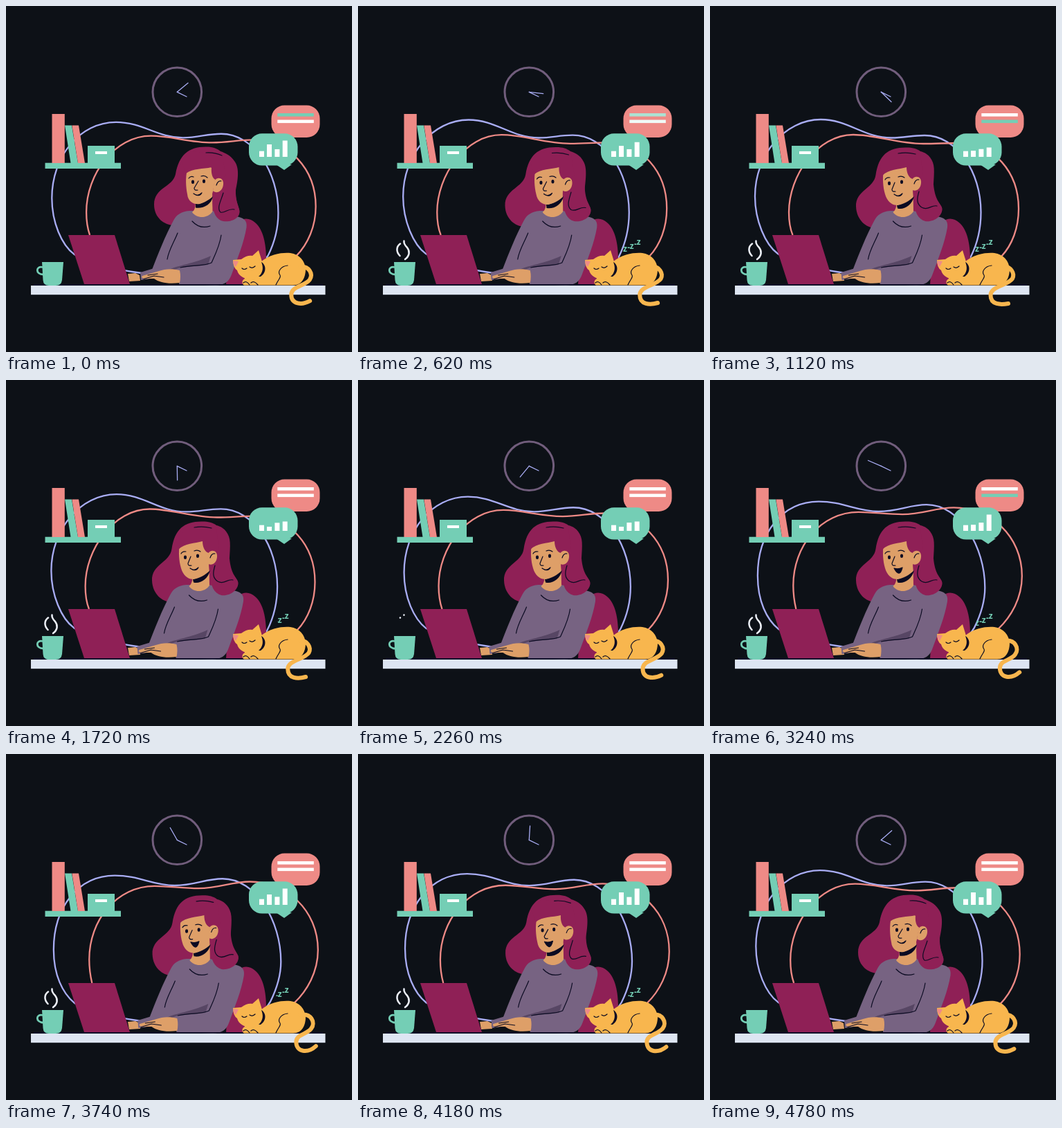
These frames come from a looping animation (500 px wide and 500 px high, 4.8 s). An HTML page:

```html
<!DOCTYPE html>
<html lang="en">
<head>
<meta charset="utf-8">
<title>Working late</title>
<style>
  html, body { margin: 0; width: 100%; height: 100%; overflow: hidden; background: #0d1117; }
  svg { display: block; width: 100%; height: 100%; }
  .teal { fill: #74ceb5; }
  .coral { fill: #ee8a86; }
  .wine { fill: #8f2056; }
  .wool { fill: #776382; }
  .skin { fill: #de9f68; }
  .cat { fill: #f8b64e; }
  .white { fill: #fff; }
  .ink { fill: #0b0b22; }
  .line { fill: none; stroke: #0b0b22; stroke-width: 1.2; stroke-linecap: round; stroke-linejoin: round; }
  .eyes { stroke-width: 4; }
  .tail { fill: none; stroke: #f8b64e; stroke-width: 6; stroke-linecap: round; }
  .loop { fill: none; stroke-width: 2.3; }
  .steam { fill: none; stroke: #eef2fb; stroke-width: 2.5; stroke-linecap: round; }
  .snore { font: bold 12px "Open Sans", sans-serif; }
</style>
</head>
<body>
<svg viewBox="0 0 500 500">
  <clipPath id="snoreClip"><rect id="snoreWindow" y="330" height="30"/></clipPath>

  <g fill="none" stroke="#a9adf4" stroke-width="1.3" stroke-linecap="round">
    <circle cx="247.3" cy="124.3" r="35.3" stroke="#715d7c" stroke-width="3"/>
    <path d="M247.3,124.3L261,131"/>
    <path id="minute" d="M247.3,124.3h20.5"/>
  </g>

  <path class="loop" stroke="#a9adf4" data-by="sway"
    d="M65,275C65,215 108,164 160,164C200,164 222,190.5 262,190.5C282,190.5 290,187 310,187C357,187 391.5,240 391.5,298C391.5,320 387,342 377,362C360,390 300,395 196,386C160,381 120,372 98,358C80,345 65,310 65,275Z"
    data-to="M69,283C69,222 104,176 157,176C192,176 212,190 243,190C272,190 288,180 313,180C362,180 397.5,242 397.5,300C397.5,320 392,338 382,358C365,390 300,395 196,386C160,381 120,372 99,360C82,346 69,320 69,283Z"/>
  <path class="loop" stroke="#ee8a86" data-by="sway"
    d="M119.5,331C115,320 114,310 114,298C114,245 155,186 207,186C240,186 270,199 308,199C328,199 340,198 360,198C410,198 446,240 446,293C446,320 437,345 421,362"
    data-to="M124.5,331C122,320 120.5,310 120.5,297C120.5,240 160,191 215,191C235,191 255,194 277,194C307,194 325,184 352,184C405,184 451,225 451,283C451,315 435,342 416,360"/>

  <!-- shelf -->
  <rect class="teal" x="56.5" y="226.7" width="109.5" height="8.3"/>
  <rect class="coral" x="66.5" y="156" width="18.3" height="71"/>
  <path class="teal" d="M85,172.5H95L104,227H93.5Z"/>
  <path class="coral" d="M95.3,172.5H105L114,227H104Z"/>
  <rect class="teal" x="118" y="202" width="39" height="25"/>
  <rect class="white" x="129" y="210" width="17" height="4"/>

  <!-- speech bubbles -->
  <rect class="coral" x="383.5" y="143.5" width="70" height="46.5" rx="19"/>
  <rect id="row1" x="392.3" y="155" width="52.5" height="4.6"/>
  <rect id="row2" x="392.3" y="164.5" width="52.5" height="4.6"/>
  <rect class="teal" x="351" y="184.3" width="70.5" height="46.3" rx="19"/>
  <path class="teal" d="M390,229H413L402,237Z"/>
  <g id="bars" class="white">
    <rect x="366" width="7"/><rect x="377" width="7"/><rect x="388.4" width="7"/><rect x="399.7" width="7"/>
  </g>

  <!-- woman -->
  <path class="wine" d="M318,403L322,330C335,304 350,304 360,313C372,323 376,345 376,365V403Z"/>
  <path class="wine" data-by="lean"
    d="M290,203.5C264,203 250,215 245,243C241,262 214,262 214,287C214,306 229,317 243,317L300,310C325,312 340,308 337,294C335,286 331,280 332,266C335,252 338,234 330,224C325,216 316,212 310,210C305,206 299,203.5 290,203.5Z"
    data-to="M284,204.5C258,204 244,215 239.5,244C237,264 210,266 211,290C212,310 226,320 238,321L296,310C312,312 339,305 335,291C332,284 325,280 323,268C322,256 326,236 322,226C318,215 309,211 304,210C299,206 292,204.5 284,204.5Z"/>
  <path class="skin" d="M176,387L187,386L193,389L194,397L178,398Z"/>
  <g id="torso">
    <path class="wool" d="M194,385L214,379L250,366V384L215,393L195,396Z"/>
    <path class="wool" d="M265,296C253,297 246,302 242,310C230,332 220,358 211,381L250,382V402L303,403.5C316,403 322,399 326,388C334,366 344,342 347.5,320C349,309 343,306 332,304L298,296Z"/>
    <path fill="#574664" d="M236,381C250,374 270,373 296,361L292,374L252,378L240,382Z"/>
    <path class="line" d="M248,328C243,341 235,353 233,366M311,331C309,346 302,360 297,371C287,376 270,374 252,378"/>
    <path class="skin" d="M274,278L298,266L298.5,297C292,307 276,308 269,298Q275,294 274,278Z"/>
    <path class="line" d="M269,311Q280,323 295,318"/>
    <path class="skin" d="M251,382C240,379 229,380 221,383L197,390C194,393 200,395 206,394L214,394C222,400 235,402 251,400Q253,391 251,382Z"/>
    <path class="line" d="M199,394.5L214,390L228,392M205,389L219,387"/>
  </g>
  <path class="wine" data-by="lean"
    d="M300,258L332,258C331,280 335,286 337,294C340,306 326,313 314,311C304,309 299,299 298.5,285Z"
    data-to="M292,258L323,258C325,280 332,284 335,291C338,303 323,313 311,311C300,308 296,297 295,283Z"/>
  <path class="line" data-by="lean" d="M314,270C311,281 304,292 310,298C316,300 321,292 330,294" data-to="M302,268C299,278 298,286 306,291C315,296 320,287 328,289"/>
  <path class="ink" data-by="lean"
    d="M274,286C284,286 293,281 299,275C297,287 285,293 274,291.5Z"
    data-to="M270,288C279,287 288,282 295,275C292,288 280,295 271,292.5Z"/>
  <path class="skin" data-by="lean"
    d="M262,236C259,248 260,262 262,272C263,283 272,287.5 280,286C290,283 297,277 299,268L304,240L290,228Z"
    data-to="M251,238C249,248 250,262 253,272C256,283 264,289 272,287.5C282,285 290,278 293,268L295,240L280,228Z"/>
  <path class="wine" data-by="lean"
    d="M260,242C270,234 285,236 297,233C296,243 299,250 303,251L318,246L312,215L270,210L254,226Z"
    data-to="M249,245C258,236 273,236 284,233C284,242 288,249 293,250L308,246L304,215L262,212L246,230Z"/>
  <path class="skin" data-by="lean"
    d="M301,253C305,246 315,248 314,258C313,268 304,272 299,267Z"
    data-to="M292,251C296,244 306,246 305,256C304,266 296,269 291,265Z"/>
  <path class="line" data-by="lean" d="M304,259Q306,252 311,253" data-to="M295,257Q297,250 302,251"/>
  <path class="line" data-by="lean" d="M289,212Q300,211 312,216" data-to="M272,213Q285,211 297,214"/>
  <path class="line" data-by="lean"
    d="M264,249Q267,245 271,247M282,246Q287,244 291,248M278,253L272,263Q272,267 277,266"
    data-to="M253,251Q255,247 260,248M272,247Q277,245 281,248M267,255L263,265Q263,269 268,268"/>
  <path class="line eyes" data-by="lean" d="M270,253.5L270,255M286,252.5L286,254" data-to="M259,255.5L259,257M277,253.5L277,255"/>
  <path id="mouth" class="line" style="fill:#0b0b22"/>

  <!-- desk -->
  <rect x="40" y="402" width="418" height="1.6" fill="#0f0f2c"/>
  <rect x="36" y="404" width="425.5" height="13.2" fill="#dde5f2"/>
  <path class="wine" d="M90,331H157L179,402H113Z"/>
  <path class="teal" d="M52,370H83L81,396Q80,404 72,404H62Q54,404 53.5,396Z"/>
  <path d="M53,377.5C43,375 42,388 54,388" fill="none" stroke="#74ceb5" stroke-width="2.8"/>
  <path class="steam" pathLength="100" d="M60.5,361C55,355 55,348 61,343.5"/>
  <path class="steam" pathLength="100" d="M68,366C75,361 75,354 71,349C67,345 66,343 66.5,339.5"/>

  <!-- cat -->
  <path class="cat" d="M344,403.5C340,401 341,396 345,394L345,385L368,370C382,358 400,356 411,357C424,359 432,368 433,380C433,392 428,403.5 415,403.5Z"/>
  <path class="tail" data-by="tail"
    d="M425,377C434,376 441,386 437,394C430,404 405.5,405 405.5,418C405.5,432 420,432 431,430"
    data-to="M425,377C441,374 448,388 441,397C434,406 419.5,405 419.5,416C419.5,431 436,433 448,422"/>
  <path class="cat" d="M328,367L340,366C346,361 352,360 356,361L365,353L369,366C373,377 371,388 362,393C350,397 337,393 334,382Q328,378 328,367Z"/>
  <path class="coral" d="M328.5,368L336,369L332,377Q328,374 328.5,368Z"/>
  <path class="ink" d="M369,370C376,374 377,385 368,391L365,391C372,385 372,377 369,370Z"/>
  <path class="line" d="M341,379Q344,382 348,379M352,377Q356,380 360,376M407,375C397,376 392,384 396,389C398,392 394,394 390,403M343,400Q347,396 352,403M354,400Q358,396 364,403"/>
  <text class="snore teal" clip-path="url(#snoreClip)" x="383 389.2 392.8 399 402.8" y="355 353 350.5 348.3 345">z-z-z</text>
</svg>
<script>
  const LOOP = 4800;
  const $ = id => document.getElementById(id);
  const NUMBER = /-?[\d.]+/g;
  const morphs = [...document.querySelectorAll('[data-to]')].map(el => ({
    el, by: el.dataset.by, from: el.getAttribute('d'), to: el.dataset.to.match(NUMBER)
  }));
  const bars = [...$('bars').children];
  const steam = document.querySelectorAll('.steam');

  // Eased 0..1 progress of t between two moments
  const ramp = (t, a, b) => {
    const p = Math.min(1, Math.max(0, (t - a) / (b - a)));
    return p * p * (3 - 2 * p);
  };
  const wave = (t, low) => (1 - Math.cos((t - low) / LOOP * 2 * Math.PI)) / 2;
  const mix = (from, to, p) => {
    let i = 0;
    return from.replace(NUMBER, v => (+v + (to[i++] - v) * p).toFixed(2));
  };
  const tint = p => `rgb(${255 - 139 * p},${255 - 49 * p},${255 - 74 * p})`;

  function draw(t) {
    const half = t % (LOOP / 2);
    const lean = ramp(t, 180, 1060) - ramp(t, 3400, 4640);
    const pose = { lean, sway: wave(t, 1080) ** 1.3, tail: wave(t, 1170) };
    for (const m of morphs) m.el.setAttribute('d', mix(m.from, m.to, pose[m.by]));

    $('minute').setAttribute('transform', `rotate(${t / LOOP * 360 - 40} 247.3 124.3)`);
    $('torso').setAttribute('transform', `translate(${-4.5 * lean} 0)`);

    const open = ramp(t, 2500, 3100) - ramp(t, 4250, 4650);
    const x = 271 - 5 * lean, y = 271 + lean;
    $('mouth').setAttribute('d',
      `M${x},${y}Q${x + 6},${y + 5 - 3 * open} ${x + 12},${y - 1}Q${x + 8},${y + 6 + 9 * open} ${x},${y}Z`);

    $('row1').setAttribute('fill', tint(1 - ramp(half, 560, 700)));
    $('row2').setAttribute('fill', tint(ramp(half, 590, 740) - ramp(half, 1180, 1320)));
    const heights = [
      8.3,
      18 - 12 * (ramp(t, 300, 1500) - ramp(t, 2800, 4200)),
      11 + wave(t, 300),
      23.5 - 10 * (ramp(t, 400, 1120) - ramp(t, 2300, 3150))
    ];
    bars.forEach((bar, i) => {
      bar.setAttribute('y', 218 - heights[i]);
      bar.setAttribute('height', heights[i]);
    });

    const start = 100 * ramp(half, 1800, 2280), end = 100 * ramp(half, 40, 600);
    for (const s of steam) {
      s.style.visibility = end - start > 0.1 ? 'visible' : 'hidden';
      s.setAttribute('stroke-dasharray', `${Math.max(0, end - start)} 300`);
      s.setAttribute('stroke-dashoffset', -start);
    }

    const first = t < 2300;
    const left = first ? 382 + 30 * ramp(t, 1400, 2200)
      : 382 + 8.5 * ramp(t, 3000, 3600) + 21.5 * ramp(t, 4180, 4740);
    const right = 382 + 30 * (first ? ramp(t, 100, 760) : ramp(t, 2320, 2960));
    $('snoreWindow').setAttribute('x', left);
    $('snoreWindow').setAttribute('width', Math.max(0, right - left));
  }

  const begin = performance.now();
  function tick() {
    draw((performance.now() - begin) % LOOP);
    requestAnimationFrame(tick);
  }
  tick();
</script>
</body>
</html>
```
